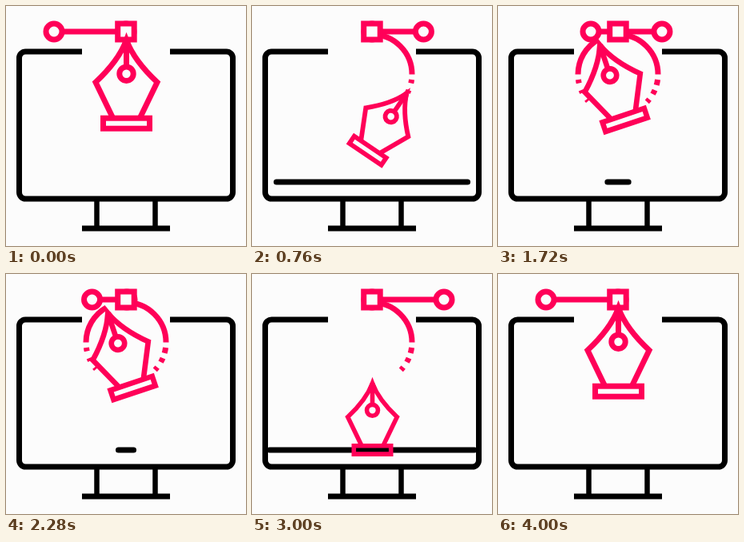
Animation of 300 by 300 pixels, one loop 4.04 s. Source, as an HTML page:

```html
<!DOCTYPE html>
<html lang="en">
<head>
<meta charset="utf-8">
<title>Pen tool on a monitor</title>
<style>
  html, body { margin: 0; width: 100%; height: 100%; overflow: hidden; background: #fcfcfc; }
  svg { display: block; width: 100%; height: 100%; }
  .ink { fill: none; stroke: #000; stroke-width: 7; }
  .pink { fill: none; stroke: #ff0058; stroke-width: 7; }
  .solid { fill: #fcfcfc; }
</style>
</head>
<body>
<svg viewBox="0 0 300 300">
  <g class="ink">
    <path d="M95 57H24.500a8 8 0 0 0-8 8V233a8 8 0 0 0 8 8H275.500a8 8 0 0 0 8-8V65a8 8 0 0 0-8-8H205"/>
    <path d="M113.500 241V278M186.500 241V278" stroke-width="6.500"/>
    <path d="M95 278H205"/>
    <path id="bar" stroke-linecap="round"/>
  </g>
  <g class="pink">
    <path id="arcs"/>
    <path id="leftLine"/>
    <path id="rightLine"/>
    <circle id="leftKnob" class="solid" cy="32" r="10"/>
    <circle id="rightKnob" class="solid" cy="32" r="10"/>
    <rect class="solid" x="139.700" y="22" width="20.500" height="20"/>
    <g id="pen">
      <path d="M0-42Q-10-16-38.500 10.500L-17.500 54M0-42Q10-16 38.500 10.500L17.500 54"/>
      <path d="M-3.600-32.500L0-42L3.600-32.500"/>
      <path d="M0-42V-8"/>
      <circle r="8.700"/>
      <rect x="-29" y="55.500" width="58" height="13"/>
    </g>
  </g>
</svg>
<script>
const LOOP = 4040, LEG = 1000, END = 4 * LEG;
const el = id => document.getElementById(id);
const rad = deg => deg * Math.PI / 180;
const clamp = v => Math.min(1, Math.max(0, v));
const ramp = (t, from, to, power = 1) => clamp((t - from) / (to - from)) ** power;
const cubic = u => u < 0.5 ? 4 * u ** 3 : 1 - 4 * (1 - u) ** 3;

// 0 with the pen at the top, 1 with the pen at the bottom.
const drop = t => Math.abs(t - 2 * LEG * Math.round(t / (2 * LEG))) / LEG;

// Arc on the big circle; angles run from the top, side is 1 (right) or -1 (left).
function arc(from, to, side) {
  if (to - from < 0.05) return "";
  const at = a => `${150 + side * 50 * Math.sin(rad(a))} ${85.5 - 50 * Math.cos(rad(a))}`;
  return `M${at(from)}A50 50 0 0 ${side > 0 ? 1 : 0} ${at(to)}`;
}

function dashes(grow, side) {
  let path = "";
  for (let i = 0; i < 3; i++) {
    const from = 97.5 + 15.5 * i;
    path += arc(from, from + (8 - 1.5 * i) * grow, side);
  }
  return path;
}

function handle(side, x) {
  el(side + "Line").setAttribute("d", `M150 32H${x}`);
  el(side + "Knob").setAttribute("cx", x);
}

function drawPen(angle) {
  const turn = 37.5 * Math.sin(rad(angle));
  const scale = 1 - 0.2 * Math.sin(rad(angle / 2));
  const x = 150.5 + 47 * Math.sin(rad(angle));
  const y = 89.7 - 47 * Math.cos(rad(angle));
  el("pen").setAttribute("transform",
    `translate(${x} ${y}) rotate(${turn}) scale(${scale}) translate(0 42)`);
}

function draw(time) {
  const t = Math.min(time, END);
  const u = drop(t);

  // The outer legs sweep the right side, the inner two the left.
  const onRight = t < LEG || t > 3 * LEG;
  const sweep = 180 * u ** (onRight ? 1.65 : 1.42);
  const angle = onRight ? sweep : 360 - sweep;
  drawPen(angle);

  const rightGrow = onRight ? u ** 1.5 : 1;
  const leftGrow = onRight ? 0 : clamp(1 - u / 0.8);
  el("arcs").setAttribute("d",
    arc(0, Math.min(angle, 90), 1) + dashes(rightGrow, 1)
    + arc(onRight ? 90 : sweep, 90, -1) + dashes(leftGrow, -1));

  const leftIn = ramp(t, 0, 540) - ramp(t, 1550, 2000) + ramp(t, 2000, 2530) - ramp(t, 3460, END);
  const slide = from => ramp(t, from, from + 600, 1.5);
  const rightOut = slide(280) - slide(1400) + slide(2250) - slide(3100);
  handle("left", 60 + 90 * leftIn);
  handle("right", 150 + 90 * rightOut);

  const half = 128 * cubic(drop(t - 15));
  el("bar").setAttribute("d", half > 0.3 ? `M${150 - half} 220H${150 + half}` : "");
}

const start = performance.now();
function tick() {
  const t = (performance.now() - start) % LOOP;
  draw(Math.floor(t / 40) * 40);
  requestAnimationFrame(tick);
}
draw(0);
requestAnimationFrame(tick);
</script>
</body>
</html>
```
